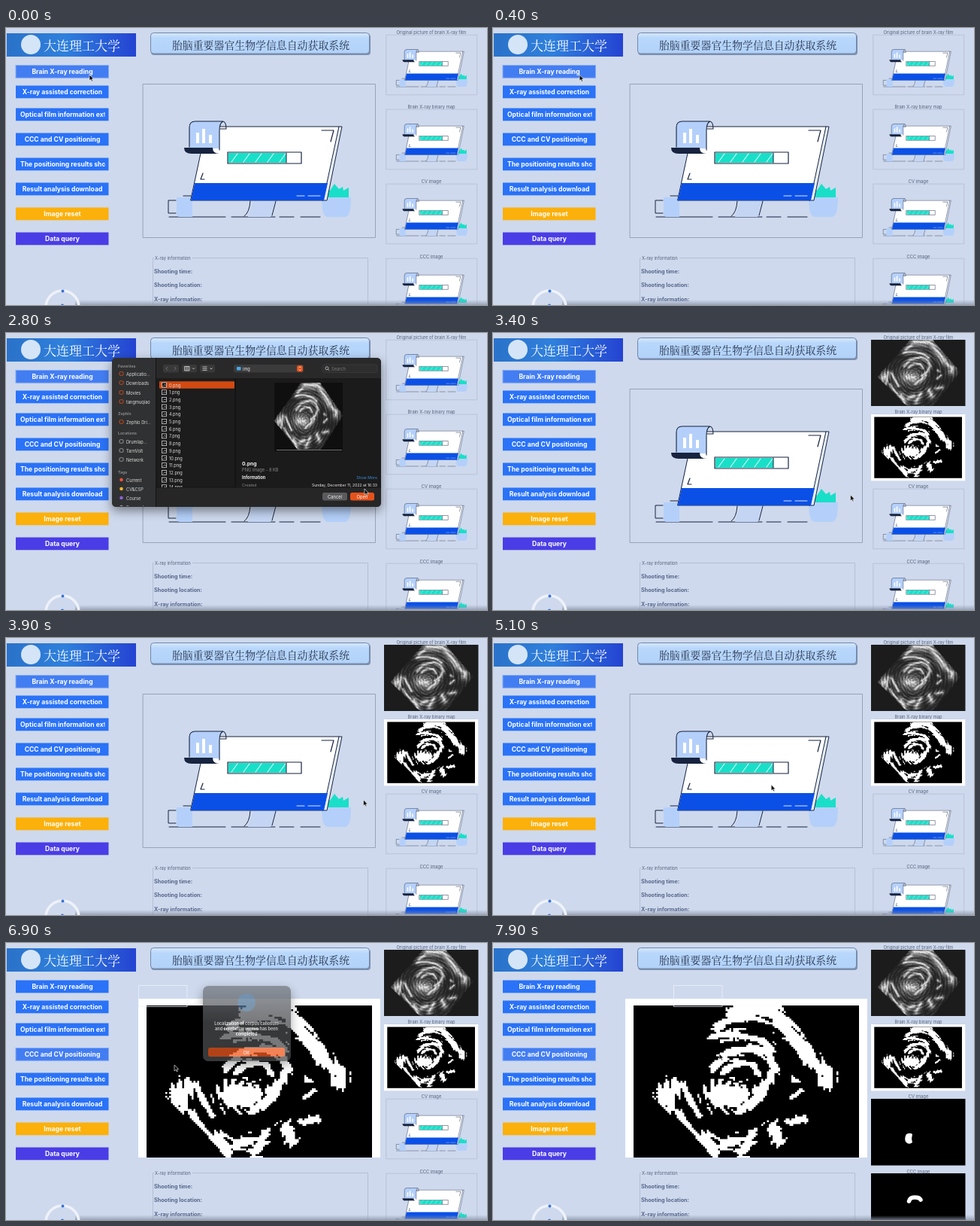
An HTML page that plays this animation: 640x368 px, repeating every 8000 ms.

```html
<!DOCTYPE html>
<html lang="en">
<head>
<meta charset="utf-8">
<title>Image analysis demo</title>
<style>
html, body { margin: 0; width: 100%; height: 100%; overflow: hidden; background: #ced9ed; }
svg { display: block; width: 640px; height: 368px; }
text { font-family: Inter, "Noto Sans", sans-serif; dominant-baseline: central; white-space: pre; }
.cjk { font-family: "Noto Serif CJK SC", "Noto Sans CJK SC", "Noto Sans CJK", sans-serif; }
</style>
</head>
<body>
<svg id="stage" viewBox="0 0 640 368" xmlns="http://www.w3.org/2000/svg"></svg>
<script>
const LOOP = 8000, STEP = 100;

const label = (x, y, s, size, fill, extra = '') =>
  `<text x="${x}" y="${y}" font-size="${size}" fill="${fill}" ${extra}>${s}</text>`;
const box = (x, y, w, h, fill, extra = '') =>
  `<rect x="${x}" y="${y}" width="${w}" height="${h}" fill="${fill}" ${extra}/>`;
const line = (d, extra = '') => `<path d="${d}" fill="none" ${extra}/>`;
const MID = 'text-anchor="middle"', END = 'text-anchor="end"', BOLD = 'font-weight="700"';

// Scan: bright strokes (width, then points) inside a fan, sampled on a coarse grid.
const FAN = [[209, 200], [312, 82], [382, 82], [470, 185], [385, 293], [300, 293]];
const STROKES = [
  [26, 325, 90, 372, 90], [22, 376, 92, 402, 126, 420, 150], [16, 424, 156, 446, 174], [18, 446, 172, 443, 184],
  [12, 318, 98, 298, 114], [11, 292, 124, 325, 121, 354, 129, 370, 140],
  [10, 292, 166, 312, 147, 345, 139, 368, 149, 375, 166, 366, 184, 348, 198],
  [9, 306, 170, 325, 158, 344, 160, 352, 172], [36, 302, 201, 324, 204], [14, 328, 222, 350, 208, 360, 194],
  [26, 231, 198, 227, 206], [12, 241, 187, 235, 222],
  [9, 251, 188, 262, 208, 274, 230], [8, 248, 224, 258, 240, 272, 254],
  [20, 282, 260, 292, 280], [15, 306, 268, 324, 262], [14, 345, 254, 330, 280], [15, 372, 244, 380, 262],
  [9, 394, 238, 414, 234], [8, 422, 258, 428, 262], [6, 400, 180, 405, 184], [6, 398, 206, 410, 196]
];
const CELL = 2.5, COLS = 120, ROWS = 84;

function segmentDistance(x, y, ax, ay, bx, by) {
  const dx = bx - ax, dy = by - ay;
  const k = Math.max(0, Math.min(1, ((x - ax) * dx + (y - ay) * dy) / (dx * dx + dy * dy)));
  return Math.hypot(x - ax - k * dx, y - ay - k * dy);
}
function inFan(x, y) {
  return FAN.every(([ax, ay], i) => {
    const [bx, by] = FAN[(i + 1) % FAN.length];
    return (bx - ax) * (y - ay) - (by - ay) * (x - ax) >= 0;
  });
}
// Streaks that curl around the middle of the scan.
function texture(x, y) {
  const r = Math.hypot(x - 325, y - 195), a = Math.atan2(y - 195, x - 325);
  return Math.sin(r * .62 + 1.6 * Math.sin(3 * a)) * Math.sin(5 * a + r * .11);
}
function brightness(i, j) {
  const x = 187 + (i + .5) * CELL, y = 83 + (j + .5) * CELL;
  if (!inFan(x, y)) return -1;
  let best = 0;
  for (const [w, ...p] of STROKES)
    for (let k = 0; k + 3 < p.length; k += 2)
      best = Math.max(best, Math.exp(-1.4 * segmentDistance(x, y, p[k], p[k + 1], p[k + 2], p[k + 3]) / w));
  const hash = Math.abs(Math.sin(i * 12.9898 + j * 78.233) * 43758.5) % 1;
  return best + .2 * texture(x, y) + .12 * (hash - .5);
}
const field = Array.from({ length: ROWS }, (_, j) => Array.from({ length: COLS }, (_, i) => brightness(i, j)));

function levelPath(limit, fill) {
  let d = '';
  field.forEach((row, j) => {
    for (let i = 0; i < COLS; i++) {
      if (row[i] <= limit) continue;
      const from = i;
      while (i < COLS && row[i] > limit) i++;
      d += `M${187 + from * CELL} ${83 + j * CELL}h${(i - from) * CELL}v${CELL}h${(from - i) * CELL}z`;
    }
  });
  return `<path d="${d}" fill="${fill}"/>`;
}
const grayScan = [-.6, .16, .28, .4, .52, .64, .77, .9]
  .map((limit, i) => levelPath(limit, `rgb(${Array(3).fill(36 + 10 * i + 2.4 * i * i)})`)).join('');

const INK = '#17233f', SKY = '#b4d0fa';
const art = `
<g id="art" stroke-linejoin="round" stroke-linecap="round">
  ${box(182.5, 74.5, 309, 204, 'none', 'stroke="#929db2" stroke-width=".9"')}
  ${line('M226 229H216V246H226M217 251H292M300 251H358M364 251H383M392 251H418M236 223H246', `stroke="${INK}"`)}
  <path d="M227 225H248V251H231Q227 251 227 246Z" fill="${SKY}"/>
  <path d="M329 229H358L352 251H322Z" fill="#c3d5f3"/>
  ${line('M325 230Q324 245 317 250M359 230L354 249', `stroke="${INK}"`)}
  <path d="M425 225V211L431 216L437 207L443 214L448 211L449 216L456 212V225Z" fill="#19dfc8"/>
  <path d="M420 225H459Q459 251 451 251H428Q420 251 420 225Z" fill="${SKY}"/>
  <path d="M443 131H447L427 229H421Z" fill="#e8f0fd" stroke="${INK}"/>
  <path d="M267 131H443L422 229H246Z" fill="#fff" stroke="${INK}"/>
  <path d="M251 206H428L423 229H246Z" fill="#0b50e6"/>
  ${line('M387 223H397M402 223H418', 'stroke="#dbe7ff"')}
  ${line('M420 136H436L432 151M262 193L259 201H264', `stroke="${INK}" stroke-width="1.2"`)}
  <path d="M252 124H290Q283 126 284 137V160H244V132Q244 124 252 124Z" fill="${SKY}"/>
  ${line('M244 158V132Q244 124 252 124H288Q293 124 293 134H285M284 162V136Q284 126 289 124', `stroke="${INK}" stroke-width="1.1"`)}
  <path d="M237 159H275Q275 167 284 167H247Q237 167 237 159Z" fill="${INK}"/>
  ${box(253, 139, 4, 14, '#fff') + box(261, 134, 4, 19, '#fff') + box(270, 142, 4, 11, '#fff')}
  ${box(295, 165, 98, 15, '#fff', `stroke="${INK}" stroke-width="1.2"`)}
  ${box(296, 166, 77, 13, '#19dfc8')}
  ${line([0, 1, 2, 3, 4].map(i => `M${300 + i * 16} 178L${308 + i * 16} 167`).join(''), 'stroke="#d8fff8" stroke-width="1.1"')}
  ${line('M373 166V179', `stroke="${INK}"`)}
</g>`;

const defs = `<defs>
  <linearGradient id="banner"><stop stop-color="#2a72c9"/><stop offset=".45" stop-color="#2f80dc"/><stop offset="1" stop-color="#2443d2"/></linearGradient>
  <linearGradient id="plate" x2="0" y2="1"><stop stop-color="#d8e9fd"/><stop offset=".25" stop-color="#b8d7fb"/><stop offset="1" stop-color="#b2d2f9"/></linearGradient>
  <linearGradient id="dock" x2="0" y2="1"><stop stop-color="#8c96aa" stop-opacity="0"/><stop offset="1" stop-color="#8791a6" stop-opacity=".75"/></linearGradient>
  <linearGradient id="glass" x2="0" y2="1"><stop stop-color="#74797f"/><stop offset=".5" stop-color="#4a4b4e"/><stop offset="1" stop-color="#4a4b4e"/></linearGradient>
  <filter id="shadow" x="-20%" y="-20%" width="140%" height="150%"><feDropShadow dx="0" dy="5" stdDeviation="7" flood-opacity=".45"/></filter>
  <clipPath id="mainClip"><rect x="176" y="74" width="322" height="211"/></clipPath>
  <clipPath id="scanClip"><rect x="187" y="83" width="300" height="211"/></clipPath>
  <clipPath id="captionClip"><rect x="19" y="40" width="112.5" height="260"/></clipPath>
  <clipPath id="sideClip"><rect x="141" y="33" width="60" height="197"/></clipPath>
  <clipPath id="listClip"><rect x="200" y="60" width="299" height="145"/></clipPath>
  ${art}
  <g id="gray" clip-path="url(#scanClip)">${grayScan}</g>
  <g id="binary">${box(176, 74, 322, 227, '#fff') + box(187, 83, 300, 209, '#000')}
    <g clip-path="url(#scanClip)">${levelPath(.5, '#fff')}</g></g>
</defs>`;

const BUTTONS = [
  ['Brain X-ray reading', 58], ['X-ray assisted correction', 85], ['Optical film information extraction', 115, true],
  ['CCC and CV positioning', 148], ['The positioning results shown', 181, true], ['Result analysis download', 214],
  ['Image reset', 247, false, '#fbb00b'], ['Data query', 280, false, '#4a3de6']
];
const buttons = BUTTONS.map(([s, y, long, fill = '#2a72f7'], i) =>
  box(13, y - 8.5, 123.5, 16.8, fill, `id="button${i}"`) +
  `<g clip-path="url(#captionClip)">${label(long ? 19 : 75, y + .3, s, 8.6, '#fff', BOLD + (long ? '' : ' ' + MID))}</g>`).join('');

const NAVY = '#56627b';
const titles = ['Original picture of brain X-ray film', 'Brain X-ray binary map', 'CV image', 'CCC image'];
const thumbs = titles.map((s, i) =>
  `<use href="#art" transform="translate(506 ${9 + 99 * i}) scale(.39) translate(-182 -74)"/>` +
  label(566, 5.3 + 99.3 * i, s, 5.8, NAVY, MID)).join('');

const page = `
${box(0, 0, 640, 368, '#ced9ed')}
${box(1, 7, 172, 31, 'url(#banner)')}
<circle cx="33" cy="22" r="13" fill="#d5e5f8"/>
${label(101, 22, '大连理工大学', 17, '#fff', 'class="cjk" ' + MID)}
${box(193, 8, 292, 28, '#7d91ae', 'rx="4"')}
${box(192.5, 6.5, 291, 27.5, 'url(#plate)', 'rx="4" stroke="#7187aa"')}
${label(339, 21.5, '胎脑重要器官生物学信息自动获取系统', 13.9, '#26334f', 'class="cjk" ' + MID)}
${buttons}
<use id="mainArt" href="#art"/>
${thumbs}
${line('M197 305.5H195.5V368M248 305.5H481.5V368', 'stroke="#b4bfd4"')}
${label(198, 305.5, 'X-ray information', 5.8, NAVY)}
${['Shooting time:', 'Shooting location:', 'X-ray information:'].map((s, i) => label(197, 323.3 + 18.4 * i, s, 7.2, '#56668a', BOLD)).join('')}
${box(92, 361, 548, 7, 'url(#dock)')}
<circle cx="75" cy="371" r="22" fill="none" stroke="#eef2f9" stroke-width="3.6"/>
<circle cx="75.5" cy="349.5" r="2" fill="#3973d8"/><circle cx="75" cy="368.5" r="2" fill="#3973d8"/>`;

const results = `
<g id="scans">
  ${box(503, 9, 125.5, 88, '#1c1c1c')}
  <use href="#gray" transform="translate(503 9) scale(.418) translate(-187 -83)"/>
  <use href="#binary" transform="translate(503 108) scale(.389) translate(-176 -74)"/>
</g>
<g id="located">
  <g clip-path="url(#mainClip)"><use href="#binary"/></g>
  <rect id="marker" y="56.5" width="64.5" height="28" fill="none" stroke="#eef3fc" stroke-opacity=".75"/>
</g>
<g id="organs">
  ${box(503, 207, 125.5, 88.5, '#000') + box(503, 306, 125.5, 62, '#000')}
  <path d="M550 254Q555 251.5 558 254L557 260L558 265Q553 269 549 264Q547 259 550 254Z" fill="#fff"/>
  ${line('M553.5 343Q555 337.5 561 338Q567 337.5 569 341', 'stroke="#fff" stroke-width="5.5" stroke-linecap="round"')}
  ${box(503, 362, 125.5, 6, 'url(#dock)')}
</g>`;

const ORANGE = '#e4521b', PALE = '#dcdcdc', DIM = '#8a8a8c';
const SIDE = [
  ['Favorites', 44], ['Applicatio...', 54, ORANGE], ['Downloads', 66, ORANGE], ['Movies', 79, ORANGE], ['tangmuqiao', 91, ORANGE],
  ['Zephlo', 107], ['Zephlo Dri...', 118, ORANGE], ['Locations', 133], ['Drumlap...', 144, '#a9a9aa'],
  ['TarnVolt', 156, '#a9a9aa'], ['Network', 168, '#a9a9aa'], ['Tags', 185], ['Current', 195, '#f0503c'],
  ['CV&amp;CSP', 207, '#f5b52e'], ['Course', 219, '#8c63d8'], ['Personal', 231, '#9a9a9c']
];
const sidebar = SIDE.map(([s, y, color], i) => !color ? label(149, y, s, 5.2, DIM, BOLD)
  : (i > 11 ? `<circle cx="153.5" cy="${y}" r="2.3" fill="${color}"/>`
    : box(151, y - 2.3, 5, 4.6, 'none', `rx="1.2" stroke="${color}" stroke-width=".8"`)) + label(160, y, s, 5.7, PALE)).join('');
const files = Array.from({ length: 15 }, (_, i) => {
  const y = 69 + 9.7 * i;
  return box(207.5, y - 3, 6, 6, '#111', 'stroke="#d6d6d6" stroke-width=".8"') +
    line(`M209 ${y + 1.5}l2 -2l2 1`, 'stroke="#d6d6d6" stroke-width=".7"') + label(217, y, i + '.png', 5.7, PALE);
}).join('');

const dialog = `
<g id="dialog">
  ${box(141, 33, 358, 198, '#1d1d1e', 'rx="6" filter="url(#shadow)"')}
  <path d="M199.5 33H147Q141 33 141 39V225Q141 231 147 231H199.5Z" fill="#303132"/>
  <path d="M199.5 33H493Q499 33 499 39V60H199.5Z" fill="#29292a"/>
  <path d="M199.5 205H499V225Q499 231 493 231H199.5Z" fill="#262627"/>
  ${line('M199.5 33V231M199.5 205H499', 'stroke="#111" stroke-width=".8"')}
  <g clip-path="url(#sideClip)">${sidebar}</g>
  ${box(209, 42, 21, 10.5, '#39393a', 'rx="2"') + box(234, 42, 20, 10.5, '#39393a', 'rx="2"') + box(258, 42, 20, 10.5, '#39393a', 'rx="2"')}
  ${line('M215 45l-2 2.2l2 2.2M224 45l2 2.2l-2 2.2', 'stroke="#77777a" stroke-width=".9"')}
  ${line('M237.5 44.5h6.5v5.5h-6.5zM239.7 44.5v5.5M241.9 44.5v5.5M261.5 45h6M261.5 47.3h6M261.5 49.5h6M248 46.5l1.5 1.5l1.5 -1.5M271.5 46.5l1.5 1.5l1.5 -1.5', 'stroke="#dedede" stroke-width=".8"')}
  ${box(303, 42, 93, 10.5, '#3b3b3c', 'rx="2.5"') + box(307, 45, 5.5, 4.5, '#4aa8e8', 'rx=".8"') + label(315, 47.3, 'img', 5.7, '#e8e8e8')}
  ${box(387, 43, 8, 8.5, ORANGE, 'rx="2"') + line('M389.5 46.3l1.5 -1.5l1.5 1.5M389.5 48.3l1.5 1.5l1.5 -1.5', 'stroke="#fff" stroke-width=".8"')}
  ${box(421, 42, 73, 10.5, '#2e2e2f', 'rx="2.5" stroke="#404041" stroke-width=".6"')}
  <circle cx="427" cy="46.8" r="2" fill="none" stroke="#ccc" stroke-width=".8"/>${line('M428.5 48.3l1.8 1.8', 'stroke="#ccc" stroke-width=".8"')}
  ${label(433, 47.3, 'Search', 5.7, '#77777a')}
  <g clip-path="url(#listClip)">
    <rect id="row" x="204" y="64.2" width="100" height="9.5" fill="#d24a12" rx="1"/>
    ${files}
  </g>
  <g id="preview">
    ${box(305, 60, 194, 145, '#1b1b1c') + box(357, 66, 91, 91, '#0f0f10')}
    <use href="#gray" transform="translate(357 66) scale(.349 .428) translate(-209 -83)"/>
    ${line('M305 60V205', 'stroke="#0c0c0c"') + line('M360 155.5H447', 'stroke="#8b8b8b" stroke-width=".8"')}
    ${label(314, 173, '0.png', 6.8, '#f0f0f0', BOLD) + label(314, 181.5, 'PNG image - 8 KB', 5.7, DIM)}
    ${label(314, 192, 'Information', 5.5, '#f0f0f0', BOLD) + label(494, 192, 'Show More', 5.2, '#3f8fd6', END)}
    ${label(314, 201.5, 'Created', 5.2, DIM) + label(494, 201.5, 'Sunday, December 11, 2022 at 16:33', 5.1, '#f0f0f0', END)}
  </g>
  ${box(421, 212, 33, 10.5, '#5b5b5d', 'rx="2.5"') + label(437.5, 217.3, 'Cancel', 5.8, '#f2f2f2', MID)}
  <rect id="open" x="458" y="212" width="32" height="10.5" rx="2.5"/>
  <text id="openText" x="474" y="217.3" font-size="5.8" text-anchor="middle">Open</text>
</g>`;

const alertBox = `
<g id="alert">
  ${box(262, 57, 117, 100, 'url(#glass)', 'rx="7" filter="url(#shadow)"')}
  <circle cx="320" cy="79" r="12" fill="#4a82b4" opacity=".6"/>
  ${['Localization of corpus callosum', 'and cerebellar vermis has been', 'completed'].map((s, i) => label(320, 107 + 7.2 * i, s, 5.5, '#fff', BOLD + ' ' + MID)).join('')}
  ${box(269, 139, 102, 12, '#ee5a20', 'rx="2.5"') + label(320, 145.3, 'OK', 5.8, '#fff', MID)}
</g>`;

const pointer = '<path id="cursor" d="M0 0V8L1.9 6.3L3.2 9L4.5 8.4L3.3 5.8H5.7Z" fill="#0b0b0b" stroke="#fff" stroke-width=".6"/>';

document.getElementById('stage').innerHTML = defs + page + results + dialog + alertBox + pointer;

const $ = id => document.getElementById(id);
const show = (id, opacity) => {
  $(id).setAttribute('opacity', +opacity);
  $(id).setAttribute('display', opacity > 0 ? 'inline' : 'none');
};
const ramp = (t, from, to) => Math.max(0, Math.min(1, (t - from) / (to - from)));

// time, x, y
const TRAIL = [
  [0, 111, 62], [300, 111, 62], [1200, 230, 70], [1700, 230, 70], [2700, 477, 207], [3000, 477, 207], [3200, 475.5, 215],
  [4700, 475.5, 215], [5800, 125, 148], [6400, 125, 148], [6900, 224, 162], [7400, 311, 143], [7700, 311, 143], [7900, 301, 147]
];
function cursorAt(t) {
  const i = TRAIL.findIndex(p => p[0] > t);
  if (i < 0) return TRAIL[TRAIL.length - 1].slice(1);
  const [t0, x0, y0] = TRAIL[i - 1], [t1, x1, y1] = TRAIL[i];
  const k = (t - t0) / (t1 - t0), e = k * k * (3 - 2 * k);
  return [x0 + (x1 - x0) * e, y0 + (y1 - y0) * e];
}
function setFocus(i, on) {
  $('button' + i).setAttribute('fill', on ? '#437df2' : '#2a72f7');
  $('button' + i).setAttribute('stroke', on ? '#82abf8' : 'none');
}

function render(t) {
  const chosen = t >= 1600, located = t >= 6600;
  setFocus(0, t < 6100);
  setFocus(3, t >= 6100);
  show('dialog', ramp(t, 400, 600) * (1 - ramp(t, 2900, 3100)));
  show('row', chosen);
  show('preview', chosen);
  $('open').setAttribute('fill', chosen ? ORANGE : '#343435');
  $('openText').setAttribute('fill', chosen ? '#fff' : '#6a6a6c');
  show('scans', t >= 3300);
  show('mainArt', !located);
  show('located', located);
  $('marker').setAttribute('x', t < 7800 ? 176.5 : 240.5);
  show('organs', t >= 7800);
  show('alert', .75 * ramp(t, 6800, 6900) + .25 * ramp(t, 6900, 7000) - ramp(t, 7600, 7800));
  $('cursor').setAttribute('transform', `translate(${cursorAt(t)})`);
}

const start = performance.now();
function tick() {
  const t = (performance.now() - start) % LOOP;
  render(Math.floor(t / STEP) * STEP);
  requestAnimationFrame(tick);
}
render(0);
requestAnimationFrame(tick);
</script>
</body>
</html>
```
